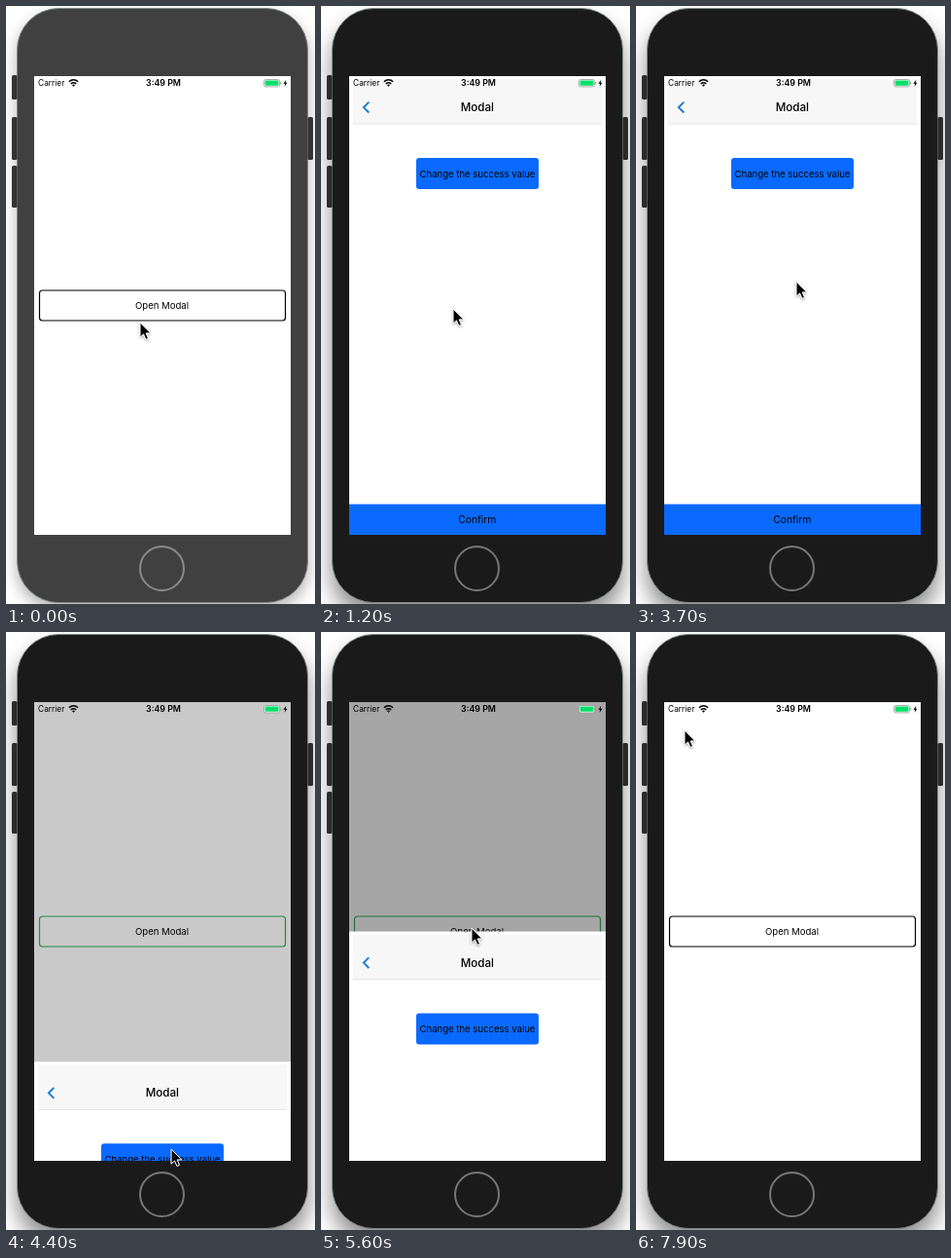
An HTML page that plays this animation: 318x614 px, repeating every 8000 ms.

```html
<!DOCTYPE html>
<html lang="en">
<head>
<meta charset="utf-8">
<title>Modal demo</title>
<style>
  html, body { margin: 0; width: 100%; height: 100%; overflow: hidden; background: #fff; }
  svg { display: block; position: absolute; left: 0; top: 0; }
  #phone {
    position: absolute; left: 11px; top: 2px; width: 300px; height: 611px; box-sizing: border-box;
    border: 1.5px solid #7d8585; border-radius: 43px;
  }
  text { font-family: Inter, sans-serif; font-size: 9.55px; text-anchor: middle; }
</style>
</head>
<body>
<div id="phone"></div>
<svg width="318" height="614" viewBox="0 0 318 614">
  <defs>
    <clipPath id="display"><rect x="29" y="72" width="264" height="471"/></clipPath>
    <filter id="soft" x="-50%" y="-50%" width="200%" height="200%">
      <feDropShadow dx="0" dy="1" stdDeviation="1" flood-opacity=".4"/>
    </filter>
  </defs>

  <g id="keys" fill="#2b2b2b">
    <rect x="6" y="71" width="5.5" height="25" rx="1.5"/>
    <rect x="6" y="114" width="5.5" height="44" rx="1.5"/>
    <rect x="6" y="164" width="5.5" height="43" rx="1.5"/>
    <rect x="310.5" y="114" width="5.5" height="44" rx="1.5"/>
  </g>
  <circle id="home" cx="160.5" cy="577.5" r="22.5" fill="none" stroke-width="2"/>

  <g clip-path="url(#display)">
    <rect x="29" y="72" width="264" height="471" fill="#fff"/>
    <g id="open">
      <rect id="outline" x="34.5" y="292" width="253" height="31" rx="3" fill="none" stroke-width="1.2"/>
      <text x="160.5" y="311">Open Modal</text>
    </g>
    <rect id="backdrop" x="29" y="72" width="264" height="471"/>

    <g id="modal">
      <rect x="29" y="72" width="264" height="471" fill="#fff"/>
      <rect x="33" y="75" width="256" height="46" fill="#f7f7f7"/>
      <path d="M33 121h256" stroke="#e3e3e3"/>
      <path id="back" d="M49.3 98.7l-5.4 5.4 5.4 5.4" fill="none" stroke="#147ad6" stroke-width="1.9"/>
      <text x="160.8" y="108" font-weight="500" style="font-size:11.6px">Modal</text>
      <g id="change">
        <rect x="98" y="156" width="126" height="32" rx="3" fill="#0a6aff"/>
        <text x="161" y="175.5">Change the success value</text>
      </g>
      <g id="confirm">
        <rect x="29" y="511.5" width="264" height="31.5" fill="#0a6aff"/>
        <text x="160.8" y="531" style="font-size:10.3px">Confirm</text>
      </g>
    </g>

    <text x="46.7" y="82.4" style="font-size:8.3px">Carrier</text>
    <g fill="none" stroke="#000" stroke-width="1.5">
      <path d="M64.9 77.8a6.3 6.3 0 0 1 9.2 0M66.8 79.9a3.7 3.7 0 0 1 5.4 0"/>
      <path d="M69.5 82.8l-1.5-1.6a2.1 2.1 0 0 1 3 0z" fill="#000" stroke="none"/>
    </g>
    <text x="162" y="82.4" font-weight="600" style="font-size:8.8px">3:49 PM</text>
    <rect x="265.5" y="75.5" width="16" height="7.4" rx="1.8" fill="#fff" stroke="#999" stroke-width=".8"/>
    <rect x="266.6" y="76.6" width="13.8" height="5.2" rx=".8" fill="#06e06a"/>
    <path d="M282.7 78v2.4" stroke="#999"/>
    <path d="M288.3 75.8l-2.9 3.9h1.8l-.6 3 2.9-4h-1.8z"/>
  </g>

  <path id="cursor" d="M0 0v15.2l3.5-3.3 2.4 5.5 2.6-1.1-2.4-5.4h4.8z"
        stroke="#fff" stroke-width="1" filter="url(#soft)"/>
</svg>
<script>
  const LOOP = 8000, STEP = 100, SLIDE = 300, HEIGHT = 471;
  const ids = ['phone', 'home', 'keys', 'open', 'outline', 'backdrop', 'modal', 'back', 'change', 'confirm', 'cursor'];
  const ui = Object.fromEntries(ids.map(id => [id, document.getElementById(id)]));

  // Pointer stops: time, x, y
  const path = [
    [0, 138, 325], [500, 136, 311], [1650, 136, 311], [2550, 150, 171], [3450, 160, 171],
    [3700, 165, 283], [4050, 170, 531], [4450, 170, 531], [5000, 155, 304], [6150, 155, 304],
    [6750, 124, 169], [7000, 124, 169], [7400, 46, 102], [7600, 46, 102], [7900, 50, 101]
  ];
  // Modal visits: start of opening, start of closing
  const visits = [[850, 4190], [5450, 7560]];

  const clamp = v => Math.min(1, Math.max(0, v));
  const ease = v => v * v * (3 - 2 * v);

  function pointerAt(t) {
    const next = path.findIndex(p => p[0] > t);
    if (next < 0) return path[path.length - 1].slice(1);
    const [a, b] = [path[next - 1], path[next]];
    const k = ease((t - a[0]) / (b[0] - a[0]));
    return [a[1] + (b[1] - a[1]) * k, a[2] + (b[2] - a[2]) * k];
  }

  // Touch feedback: quick fade down, slower fade back
  function touch(t, ...taps) {
    const depth = taps.map(s => Math.min(clamp((t - s) / 100), clamp((s + 400 - t) / 200)));
    return 1 - 0.52 * Math.max(...depth);
  }

  function shownAt(t) {
    return visits.reduce((sum, [a, b]) => sum + clamp((t - a) / SLIDE) - clamp((t - b) / SLIDE), 0);
  }

  function draw(t) {
    const active = t >= 800;
    ui.phone.style.background = active ? '#1a1a1a' : '#404040';
    ui.phone.style.boxShadow = active
      ? '0 14px 22px rgba(0,0,0,.45)' : '0 7px 15px rgba(0,0,0,.3)';
    ui.home.setAttribute('stroke', active ? '#777' : '#8a8a8a');
    ui.keys.setAttribute('fill', active ? '#2b2b2b' : '#333');

    const success = t >= visits[0][1] && t < visits[1][1];
    ui.outline.setAttribute('stroke', success ? '#2fae57' : '#000');

    const shown = shownAt(t);
    ui.backdrop.setAttribute('opacity', 0.7 * shown);
    ui.modal.setAttribute('transform', `translate(0 ${HEIGHT * (1 - ease(shown))})`);

    ui.open.setAttribute('opacity', touch(t, 750, 5150));
    ui.change.setAttribute('opacity', touch(t, 2950, 6750));
    ui.confirm.setAttribute('opacity', touch(t, 4050));
    ui.back.setAttribute('opacity', touch(t, 7400));
    ui.cursor.setAttribute('transform', `translate(${pointerAt(t)})`);
  }

  function tick(now) {
    draw(Math.floor(now % LOOP / STEP) * STEP);
    requestAnimationFrame(tick);
  }
  tick(performance.now());
</script>
</body>
</html>
```
